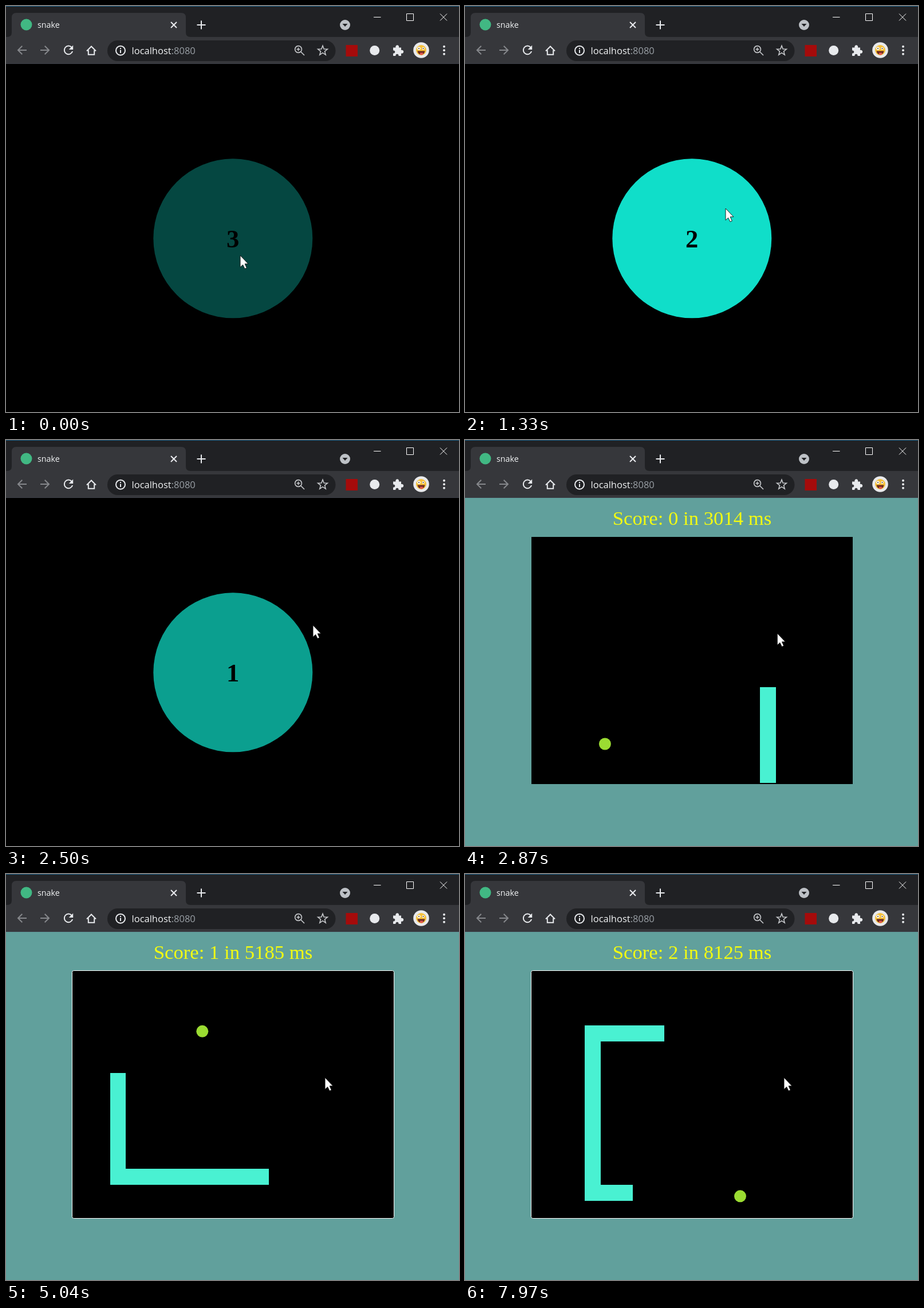
An HTML page for the animation above (8000 ms loop, 791x708 px).

```html
<!DOCTYPE html>
<html lang="en">
<head>
<meta charset="utf-8">
<title>snake</title>
<style>
  html, body { margin: 0; width: 100%; height: 100%; overflow: hidden; background: #000; }
  svg { display: block; }
  .ui { font-family: "Open Sans", "Noto Sans", sans-serif; }
  .serif { font-family: "Liberation Serif", "Times New Roman", serif; text-anchor: middle; }
  .line { fill: none; stroke: #e8eaed; stroke-width: 2; }
  .dim { stroke: #85878b; }
  .fine { stroke: #c8cacd; stroke-width: 1.6; }
  .thin { stroke-width: 1; stroke: #fff; }
</style>
</head>
<body>
<svg width="791" height="708" viewBox="0 0 791 708">
  <defs>
    <clipPath id="field"><rect x="118" y="172" width="557" height="426"/></clipPath>
  </defs>

  <g id="countdown">
    <circle id="pulse" cx="396.3" cy="405.3" r="139" fill="#11e6d0"/>
    <text id="digit" class="serif" x="396" y="420.5" font-size="44.5" font-weight="bold"></text>
  </g>

  <g id="game">
    <rect y="101" width="791" height="607" fill="#61a09c"/>
    <text id="score" class="serif" x="396.5" y="148" font-size="34.7" fill="#f2fb12"></text>
    <rect x="116" y="169" width="561" height="431"/>
    <rect id="focus" x="115.5" y="168.500" width="562" height="432" rx="3" stroke="#fff"/>
    <path id="snake" fill="#49f1d2" clip-path="url(#field)" shape-rendering="crispEdges"/>
    <circle id="food" r="10.500" fill="#9bdc32"/>
  </g>

  <g id="browser">
    <rect width="791" height="101" fill="#202124"/>
    <rect width="791" height="1" fill="#1c5f85"/>
    <path d="M2 54Q10 54 10 46V20Q10 12 18 12H306Q314 12 314 20V46Q314 54 322 54H791V100H0V54Z" fill="#36373b"/>
    <rect y="100" width="791" height="1" fill="#3c3f48"/>
    <rect x="177" y="60" width="398.5" height="36" rx="18" fill="#202124"/>

    <circle cx="35.5" cy="32.5" r="10" fill="#41b883"/>
    <text class="ui" x="55" y="38" font-size="14.3" fill="#f1f3f4">snake</text>
    <path class="line" d="M288 28l10 10m0-10l-10 10"/>
    <path class="line" d="M333.5 33h15m-7.5-7.5v15"/>
    <circle cx="592" cy="33" r="9" fill="#bdc1c6"/>
    <path d="M587.5 31h9l-4.5 5z" fill="#202124"/>
    <path class="line thin" d="M642 19.5h12.500M699.5 13.5h12v12h-12zM758 13.5l12 12m0-12l-12 12"/>

    <path class="line dim" d="M36 77H21m7.3-7.3L21 77l7.3 7.3M60 77h15m-7.3-7.3L75 77l-7.3 7.3"/>
    <path class="line" d="M114.5 72a7.3 7.3 0 1 0 1.6 7"/>
    <path d="M117.2 68.5v7.5h-7.5z" fill="#e8eaed"/>
    <path class="line" d="M141 78.5l8-8 8 8M143.8 77v7.8h10.4V77"/>
    <circle class="line" cx="200" cy="77.7" r="8"/>
    <path class="line" d="M200 76.5v5.500M200 73v2"/>
    <text class="ui" x="219.5" y="84" font-size="16.5" fill="#f1f3f4">localhost<tspan fill="#9aa0a6">:8080</tspan></text>
    <circle class="line fine" cx="510.5" cy="75.5" r="5.9"/>
    <path class="line fine" d="M515 80l6 6M507.5 75.5h6m-3-3v6"/>
    <path id="star" class="line fine"/>

    <rect x="593.5" y="68" width="20.5" height="20" fill="#a50b0b"/>
    <circle cx="643.7" cy="77.5" r="8.5" fill="#e8eaed"/>
    <path d="M676 72.5h4.5a3 3 0 1 1 5.5 0h4v4.5a3 3 0 1 1 0 5.5v4.5h-4.5a2.6 2.6 0 1 0-5 0H676v-4.5a2.6 2.6 0 1 0 0-5z" fill="#e8eaed"/>
    <circle cx="725" cy="77" r="13.8" fill="#e9eaec"/>
    <circle cx="725" cy="77" r="9" fill="#f5c13b"/>
    <circle cx="721" cy="74" r="2.7" fill="#fff"/><circle cx="728.5" cy="74" r="2.2" fill="#fff"/>
    <circle cx="721" cy="74" r="1" fill="#432"/><circle cx="728.5" cy="74" r="1" fill="#432"/>
    <path d="M718.5 78.5h13q-1 6-6.5 6t-6.5-6z" fill="#6b2a20"/>
    <path d="M723 81.5h5v3q-2.5 2-5 0z" fill="#e2564f"/>
    <g fill="#e8eaed">
      <circle cx="765" cy="70.7" r="2"/><circle cx="765" cy="77.2" r="2"/><circle cx="765" cy="83.7" r="2"/>
    </g>
  </g>

  <path id="cursor" d="M0 0V20.5L4.6 16.3 8 23.2 11.3 21.8 8.2 14.7H14Z" fill="#fff" stroke="#111" stroke-width=".9"/>
</svg>
<script>
  const $ = id => document.getElementById(id);
  const LOOP = 8000, LEAD = 155, GAME_START = 2845;
  const CELL = 27.78, ORIGIN = [126.05, 180.66];
  const TICK = 70.07, TICK_ZERO = 3664, FIRST_STEP = -12, BODY = 15;
  // The score clock loses a little time whenever food is eaten.
  const CLOCK_ZERO = 3851, CLOCK_TICK = 69.79, MEAL_DELAY = 8.4;

  // Every cell the head visits; the first entries are the body it starts with.
  const route = [[14, 23]];
  const moves = { U: [0, -1], D: [0, 1], L: [-1, 0], R: [1, 0] };
  for (const [, dir, count] of "U27 L12 U8 R14 U1 L13 D10 R2".matchAll(/([A-Z])(\d+)/g)) {
    for (let i = 0; i < +count; i++) {
      const [col, row] = route.at(-1), [dx, dy] = moves[dir];
      const next = row + dy;
      route.push([col + dx, next < -1 ? 14 : next]);
    }
  }
  const HEAD_OFFSET = BODY - 1 - FIRST_STEP;
  const LAST_STEP = route.length - 1 - HEAD_OFFSET;
  const MEALS = [11, 45];
  const FOOD = [[244.4, 530], [342.8, 274.3], [480.5, 561.8]];

  // time, x, y of the pointer tip
  const POINTER = [[0, 409, 435], [900, 409, 435], [1330, 455, 353], [2500, 536, 323], [3300, 557, 355], [LOOP, 557, 355]];

  const star = Array.from({ length: 10 }, (_, i) => {
    const a = i * Math.PI / 5, r = i % 2 ? 3.7 : 8.8;
    return [553 + r * Math.sin(a), 78 - r * Math.cos(a)];
  });
  $("star").setAttribute("d", "M" + star.join("L") + "Z");

  function pointerAt(t) {
    const i = POINTER.findIndex(p => p[0] > t);
    const [t0, x0, y0] = POINTER[i - 1], [t1, x1, y1] = POINTER[i];
    const u = (t - t0) / (t1 - t0), e = u * u * (3 - 2 * u);
    return [x0 + (x1 - x0) * e, y0 + (y1 - y0) * e];
  }

  function drawCountdown(t) {
    const age = t + LEAD, phase = age % 1000 / 1000;
    $("pulse").setAttribute("opacity", 1 - Math.abs(2 * phase - 1));
    $("digit").textContent = Math.max(1, 3 - Math.floor(age / 1000));
  }

  function drawGame(t) {
    const step = Math.max(FIRST_STEP, Math.min(LAST_STEP, Math.floor((t - TICK_ZERO) / TICK)));
    const score = MEALS.filter(m => step >= m).length;
    const head = step + HEAD_OFFSET;
    const cells = route.slice(head - BODY - score + 1, head + 1);
    $("snake").setAttribute("d", cells.map(([col, row]) =>
      `M${ORIGIN[0] + col * CELL} ${ORIGIN[1] + row * CELL}h${CELL}v${CELL}h-${CELL}z`).join(""));
    $("food").setAttribute("cx", FOOD[score][0]);
    $("food").setAttribute("cy", FOOD[score][1]);
    const clock = Math.round(CLOCK_ZERO + step * CLOCK_TICK + score * MEAL_DELAY);
    $("score").textContent = `Score: ${score} in ${clock} ms`;
    $("focus").style.display = step >= 1 ? "" : "none";
  }

  function draw(now) {
    const t = now % LOOP, playing = t >= GAME_START;
    $("countdown").style.display = playing ? "none" : "";
    $("game").style.display = playing ? "" : "none";
    playing ? drawGame(t) : drawCountdown(t);
    $("cursor").setAttribute("transform", `translate(${pointerAt(t)})`);
  }

  let start;
  function frame(now) {
    start ??= now;
    draw(Math.max(0, now - start));
    requestAnimationFrame(frame);
  }
  draw(0);
  requestAnimationFrame(frame);
</script>
</body>
</html>
```
